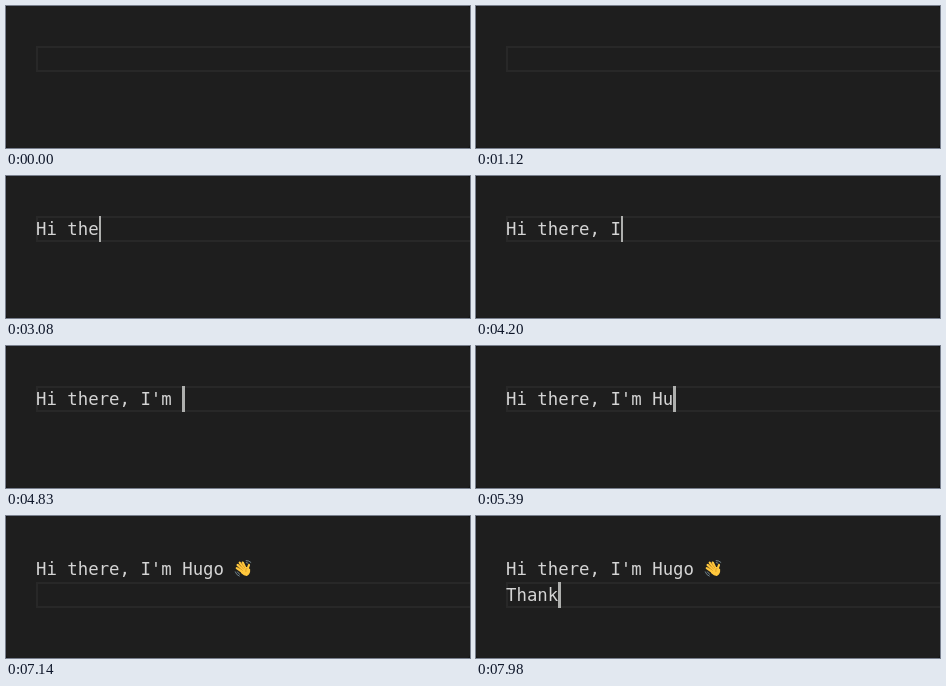
These frames come from a looping animation (464 px wide and 142 px high, 8 s). An HTML page:

```html
<!DOCTYPE html>
<html lang="en">
<head>
<meta charset="utf-8">
<title>Typing in an editor</title>
<style>
  html, body { margin: 0; width: 100%; height: 100%; overflow: hidden; background: #141414; }
  .editor {
    position: relative; width: 464px; height: 142px; overflow: hidden;
    background: #1e1e1e; border-radius: 4px;
  }
  .highlight {
    position: absolute; left: 30px; top: 40px; width: 450px; height: 26px;
    box-sizing: border-box; border: 2px solid #282828;
  }
  .line {
    position: absolute; left: 30px; height: 26px; white-space: pre;
    font: 17.35px/26px "DejaVu Sans Mono", monospace; color: #d4d4d4;
  }
  #first { top: 40px; }
  #second { top: 66px; }
  #wave { position: absolute; left: 228px; top: 43px; width: 19px; height: 19px; }
  #cursor {
    position: absolute; left: 30px; top: 40px; width: 2.5px; height: 26px;
    background: #aeafad;
  }
</style>
</head>
<body>
<div class="editor">
  <div class="highlight" id="highlight"></div>
  <div class="line" id="first"></div>
  <div class="line" id="second"></div>
  <svg id="wave" viewBox="0 0 18 18" fill="none" stroke-linecap="round" stroke-linejoin="round">
    <g stroke="#ffc83d">
      <path d="M9 13 2.6 8.6M9.5 11.5 3.4 5.6M10.5 10.5 5.4 3.4M11.5 10 8.3 3.4" stroke-width="2.1"/>
      <path d="M13 11.5Q12.6 8.5 14.2 5.6" stroke-width="2.1"/>
      <path d="M8 10.5 11.5 8.5 14.3 10Q14.6 13.5 12 15 9.8 15 7.6 12.8Z" fill="#ffc83d" stroke-width="2"/>
    </g>
    <path d="M8 10.8 4.2 7.4M9 9.5 5.3 5.2M10.3 8.6 7.3 4.2M12.3 8.6Q10.6 10 11.2 12" stroke="#cf8a1f" stroke-width=".6"/>
    <path d="M1.2 12.2Q2 15 5 16.2M3.3 12.3Q4 13.8 5.4 14.5M11.5 1.5Q14.2 1.3 16 3.2M11.6 3.4Q12.6 3.4 13.4 4.1" stroke="#7f959d" stroke-width=".8"/>
  </svg>
  <div id="cursor"></div>
</div>
<script>
  const LOOP = 8000, LEFT = 30, PITCH = 10.445, ROW = 26, TOP = 40;
  const greeting = "Hi there, I'm Hugo ";
  const reply = "Thank";

  // Moments at which each character appears
  const firstKeys = [1680, 2170, 2450, 2800, 2940, 3080, 3290, 3430, 3640, 3780,
                     4200, 4410, 4620, 4830, 5110, 5390, 5460, 5670, 5880];
  const secondKeys = [7350, 7490, 7700, 7840, 7980];
  const WAVE = 6160, ENTER = 6580;
  const hidden = [[0, 630], [1120, 1680], [7140, 7350]];

  const el = id => document.getElementById(id);
  const [first, second, wave, cursor, highlight] =
    ["first", "second", "wave", "cursor", "highlight"].map(el);

  const typed = (keys, t) => keys.filter(k => k <= t).length;

  function draw(t) {
    const a = typed(firstKeys, t), b = typed(secondKeys, t);
    const onSecond = t >= ENTER;
    const top = TOP + (onSecond ? ROW : 0) + "px";
    first.textContent = greeting.slice(0, a);
    second.textContent = reply.slice(0, b);
    wave.style.visibility = t >= WAVE ? "visible" : "hidden";

    let x = LEFT + PITCH * (onSecond ? b : a);
    if (!onSecond && t >= WAVE) x += 16;
    cursor.style.left = x + "px";
    cursor.style.top = highlight.style.top = top;
    cursor.style.visibility = hidden.some(([s, e]) => t >= s && t < e) ? "hidden" : "visible";
  }

  const start = performance.now();
  function tick(now) {
    draw(Math.max(0, now - start) % LOOP);
    requestAnimationFrame(tick);
  }
  draw(0);
  requestAnimationFrame(tick);
</script>
</body>
</html>
```
